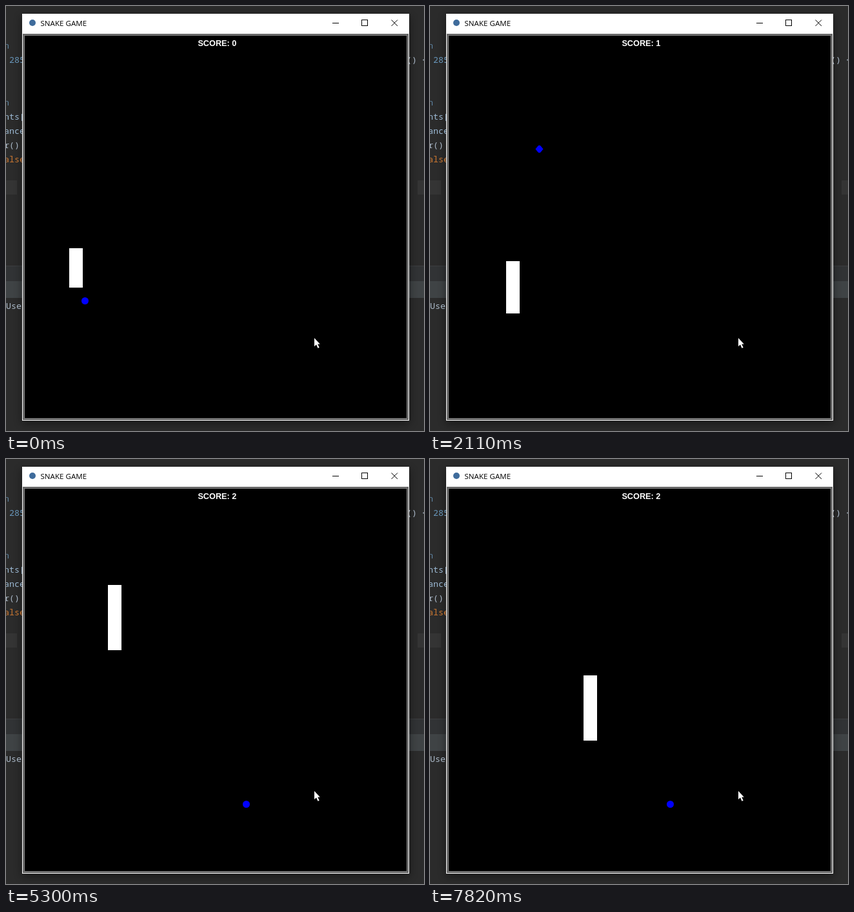
Recreate the animation shown at these times as an HTML page. Size 648x658 px, loop 8 s.

```html
<!DOCTYPE html>
<html lang="en">
<head>
<meta charset="utf-8">
<title>Snake game</title>
<style>
  html, body { margin: 0; width: 100%; height: 100%; overflow: hidden; background: #2b2b2b; }
  svg { display: block; position: absolute; left: 0; top: 0; }
  .code { font: 13.33px "Noto Sans Mono", "DejaVu Sans Mono", monospace; fill: #a9b7c6; white-space: pre; }
  .num { fill: #6897bb; }
  .kw { fill: #cc7832; }
  .name { fill: #9bb8d3; }
  .title { font: 11.6px "Open Sans", "Noto Sans", sans-serif; fill: #000; }
  .score { font: bold 12.7px "Liberation Sans", Arial, sans-serif; fill: #fff; }
  .crisp { shape-rendering: crispEdges; }
</style>
</head>
<body>
<svg width="648" height="658" viewBox="0 0 648 658">
  <defs>
    <filter id="soft" x="-10%" y="-10%" width="120%" height="120%"><feGaussianBlur stdDeviation="7"/></filter>
  </defs>

  <!-- editor behind the window -->
  <g class="crisp">
    <rect width="648" height="658" fill="#2b2b2b"/>
    <path d="M0 270h17v22h-17zM638 270h10v22h-10z" fill="#343434"/>
    <rect y="402" width="648" height="24" fill="#313335"/>
    <rect y="402" width="648" height="1" fill="#3c3e40"/>
    <rect y="426" width="648" height="26" fill="#3f4345"/>
  </g>
  <rect x="25" y="16" width="600" height="630" fill="#000" opacity=".45" filter="url(#soft)"/>
  <g class="code">
    <text class="num" x="-3" y="66" opacity=".8">n</text>
    <text class="num" x="5" y="88">285</text>
    <text class="num" x="-3" y="154" opacity=".8">n</text>
    <text class="name" x="-3" y="176">nts[</text>
    <text class="name" x="-3" y="198">ance</text>
    <text x="-3" y="220">r()</text>
    <text class="kw" x="-3" y="242">alse</text>
    <text x="0" y="469">Use</text>
    <text x="621" y="88">() &lt;</text>
  </g>

  <!-- window -->
  <g class="crisp">
    <rect x="25" y="12" width="600" height="630" fill="#fff"/>
    <rect x="26" y="43" width="598" height="598" fill="#646464"/>
    <rect x="28" y="45" width="594" height="594" fill="#808080"/>
    <rect x="29" y="46" width="592" height="592" fill="#000"/>
  </g>
  <circle cx="41" cy="26" r="5" fill="#3f6c9c"/>
  <text class="title" x="53.5" y="31">SNAKE GAME</text>
  <g fill="none" stroke="#000">
    <path class="crisp" d="M506 26.5h10M551.5 21.5h9v9h-9z"/>
    <path d="M597.5 21.5l9.5 9.5M607 21.5l-9.5 9.5"/>
  </g>

  <!-- game -->
  <text class="score" id="score" x="297.4" y="62"></text>
  <path class="crisp" id="snake" fill="#fff"/>
  <path id="food" fill="#00f"/>
  <path d="M478 514v13l3-2.8 2.5 5.6 2.2-1-2.5-5.4h3.6z" fill="#fff"/>
</svg>
<script>
const LOOP = 8000, CELL = 20, SIZE = 21;
const DIRS = { U: [0, -CELL], D: [0, CELL], R: [CELL, 0] };

// Runs of evenly spaced moves: first time, last time, directions
const RUNS = [
  [70, 200, "UU"], [340, 460, "UU"], [660, 920, "URD"], [1120, 1510, "DDDD"],
  [1710, 1710, "D"], [1860, 2110, "DDD"], [2320, 2710, "DDDR"], [2910, 3170, "RUU"],
  [3330, 3460, "UU"], [3660, 3920, "UUU"], [4120, 4510, "UUUU"], [4710, 4970, "UUU"],
  [5170, 5430, "UUU"], [5560, 5560, "R"], [5760, 6020, "RRR"], [6220, 6480, "DDD"],
  [6620, 6620, "D"], [6760, 6760, "D"], [6960, 7220, "DDD"], [7420, 7550, "DD"],
  [7690, 7820, "DD"]
];

const DISC = "m-5.5 0a5.5 5.5 0 1 1 11 0a5.5 5.5 0 1 1-11 0z";
const GEM = "m-6 0l4-5 2-1 2 1 4 5-4 5-2 1-2-1z";
const FOODS = [
  { at: 0, path: "M122.5 456.5" + DISC },
  { at: 1985, path: "M169.5 221.5" + GEM },
  { at: 5170, path: "M372.5 534.5" + DISC }
];
const SCORES = [0, 1985, 5100];

// Every cell the head visits, with the time it gets there
const trail = [415, 395, 375].map(y => ({ at: 0, x: 98, y }));
for (const [from, to, moves] of RUNS) {
  const gap = (to - from) / Math.max(1, moves.length - 1);
  [...moves].forEach((move, i) => {
    const head = trail[trail.length - 1], [dx, dy] = DIRS[move];
    trail.push({ at: from + Math.round(i * gap), x: head.x + dx, y: head.y + dy });
  });
}

const $ = id => document.getElementById(id);
const snake = $("snake"), food = $("food"), score = $("score");

function draw(t) {
  const seen = trail.filter(c => c.at <= t);
  const meal = FOODS.filter(f => f.at <= t).length - 1;
  // A new segment starts on the tail and shows one move after the meal
  const moved = seen[seen.length - 1].at > FOODS[meal].at;
  const length = 3 + meal - (meal && !moved ? 1 : 0);
  snake.setAttribute("d", seen.slice(-length)
    .map(c => `M${c.x} ${c.y}h${SIZE}v${SIZE}h-${SIZE}z`).join(""));
  food.setAttribute("d", FOODS[meal].path);
  score.textContent = "SCORE: " + (SCORES.filter(at => at <= t).length - 1);
}

const start = performance.now();
function tick() {
  draw((performance.now() - start) % LOOP);
  requestAnimationFrame(tick);
}
tick();
</script>
</body>
</html>
```
